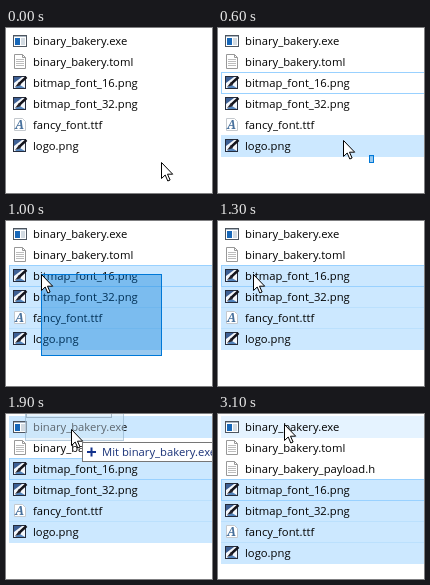
An HTML page with a canvas that plays this animation: 206 by 165 pixels, repeating every 5000 ms.

```html
<!DOCTYPE html>
<html lang="en">
<head>
<meta charset="utf-8">
<title>File selection and drop</title>
<style>
html, body { margin: 0; width: 100%; height: 100%; overflow: hidden; background: #fff; }
canvas { display: block; width: 206px; height: 165px; }
</style>
</head>
<body>
<canvas id="stage" width="206" height="165"></canvas>
<script>
const ctx = document.getElementById('stage').getContext('2d');
const LOOP = 5000, STEP = 100, ROW = 21, TOP = 2, LEFT = 3, WIDTH = 206;
const FONT = '11.25px "Open Sans", "Noto Sans", sans-serif';
const SELECTED = '#cce8ff', HOVER = '#e5f3ff', FOCUS = '#99d1ff', SEAM = '#bbe0fd';
const ANCHOR = [156, 135];

const files = [
  ['binary_bakery.exe', drawProgram],
  ['binary_bakery.toml', drawPage],
  ['bitmap_font_16.png', drawPicture],
  ['bitmap_font_32.png', drawPicture],
  ['fancy_font.ttf', drawFont],
  ['logo.png', drawPicture],
];
const payload = ['binary_bakery_payload.h', drawPage];

// Pointer positions: time, x, y
const path = [
  [0, 155, 134], [400, 155, 134], [500, 151, 127], [600, 125, 112],
  [800, 62, 72], [900, 37, 55], [1000, 35, 53], [1300, 35, 53],
  [1400, 36, 51], [1700, 57, 26], [1800, 63, 18], [1900, 65, 15],
  [2100, 66, 11], [2200, 66, 10], [LOOP, 66, 10],
];

function pointerAt(t) {
  const i = path.findIndex(p => p[0] > t);
  const [t0, x0, y0] = path[i - 1], [t1, x1, y1] = path[i];
  const k = (t - t0) / (t1 - t0);
  return [Math.round(x0 + (x1 - x0) * k), Math.round(y0 + (y1 - y0) * k)];
}

function box(x, y, w, h, fill, stroke) {
  if (fill) { ctx.fillStyle = fill; ctx.fillRect(x, y, w, h); }
  if (stroke) {
    ctx.strokeStyle = stroke;
    ctx.lineWidth = 1;
    ctx.strokeRect(x + .5, y + .5, w - 1, h - 1);
  }
}

function shape(d, fill, stroke, width = 1) {
  const p = new Path2D(d);
  if (fill) { ctx.fillStyle = fill; ctx.fill(p); }
  if (stroke) { ctx.strokeStyle = stroke; ctx.lineWidth = width; ctx.stroke(p); }
}

function label(text, x, y, color, font = FONT) {
  ctx.font = font;
  ctx.fillStyle = color;
  ctx.fillText(text, x, y);
}

function drawProgram() {
  box(0, 2, 14, 12, '#fff', '#4e5660');
  box(1, 3, 12, 1, '#aab6c2');
  box(2, 5, 5, 7, '#1767b8');
  box(8, 5, 4, 7, '#d3dbe2');
}

function drawPage() {
  shape('M1.5 .5H9.5L12.5 3.5V14.5H1.5Z', '#fff', '#989898');
  shape('M9.5 .5V3.5H12.5', null, '#989898');
  for (let y = 5; y < 13; y += 2) box(3, y, 8, 1, '#bdbdbd');
}

function drawPicture() {
  box(0, 1, 13, 13, '#f4f7fb', '#252c3c');
  shape('M1 2H9L1 8Z', '#3d5f94');
  shape('M2 13L6 9.5 12 13Z', '#5585bd');
  shape('M13.5 2L6 9', null, '#14141c', 2.4);
  shape('M6 7L2 12 8 10Z', '#25222a');
}

function drawFont() {
  shape('M1.5 1.5H9.5L12.5 4.5V13.5H1.5Z', '#fff', '#c4c9ce');
  label('A', 2, 12, '#47709c', 'italic bold 12px "Noto Serif", serif');
}

function drawPointer(x, y) {
  ctx.save();
  ctx.translate(x + .5, y + .5);
  shape('M0 0V16L3.7 12.5 6.3 18.5 8.6 17.5 6 11.7H11.2Z', '#fff', '#000');
  ctx.restore();
}

function drawRow([name, icon], index) {
  const y = TOP + index * ROW;
  ctx.save();
  ctx.translate(7, y + 3);
  icon();
  ctx.restore();
  label(name, 27, y + 15, '#000');
}

function drawDragImage(x, y) {
  box(x - 46, y - 84, 99, 96, 'rgba(206,228,243,.45)', 'rgba(110,145,175,.4)');
  box(x - 45, y - 82, 86, 71, null, 'rgba(110,130,150,.5)');
}

function drawDropHint(x, y) {
  box(x + 11, y + 13, 170, 20, '#fff', '#767676');
  box(x + 16, y + 22, 9, 2, '#14338c');
  box(x + 19.5, y + 18.5, 2, 9, '#14338c');
  label('Mit binary_bakery.exe öffnen', x + 31, y + 27, '#1a3278');
}

function draw(time) {
  const t = Math.floor(time % LOOP / STEP) * STEP;
  const [x, y] = pointerAt(t);
  const banding = t >= 600 && t < 1300;
  const dragging = t >= 1400 && t < 2200;
  const overTarget = y < TOP + ROW;
  // The selection band trails the pointer as it starts.
  const [bandX, bandY] = t === 600 ? pointerAt(500) : [x, y];
  const done = t >= 3100;
  const rows = done ? [...files.slice(0, 2), payload, ...files.slice(2)] : files;
  const focusRow = done ? 3 : 2;
  const isSelected = i => banding ? bandY < TOP + (i + 1) * ROW : t >= 1300 && i >= focusRow;

  box(0, 0, 206, 165, '#fff');
  if (overTarget) box(LEFT, TOP, WIDTH, ROW + 1, dragging ? SELECTED : HOVER);
  rows.forEach((file, i) => {
    const top = TOP + i * ROW;
    if (isSelected(i)) {
      box(LEFT, top, WIDTH, ROW + 1, SELECTED);
      if (isSelected(i - 1)) box(LEFT, top, WIDTH, 1, SEAM);
    }
    drawRow(file, i);
  });
  if (t >= 400) box(LEFT, TOP + focusRow * ROW, WIDTH, ROW + 1, null, FOCUS);

  if (banding) {
    box(bandX, bandY, ANCHOR[0] - bandX, ANCHOR[1] - bandY, 'rgba(0,120,215,.4)', '#0078d7');
  }
  if (dragging) drawDragImage(x, y);
  if (dragging && overTarget) drawDropHint(x, y);
  drawPointer(x, y);
}

const start = performance.now();
function tick() {
  draw(performance.now() - start);
  requestAnimationFrame(tick);
}
tick();
</script>
</body>
</html>
```
